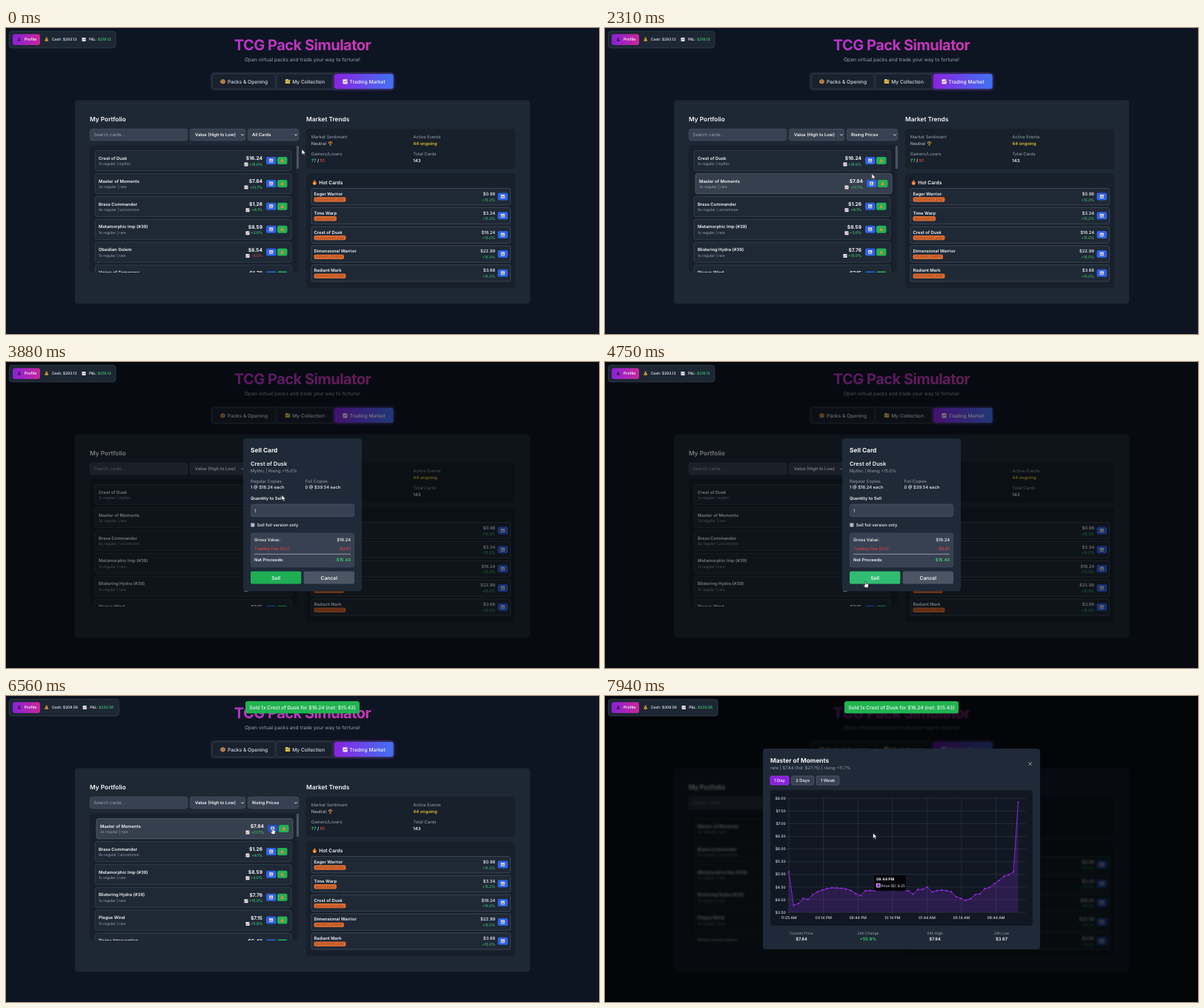
An HTML page that plays this animation: 800 px wide and 413 px high, repeating every 8 s.

```html
<!DOCTYPE html>
<html lang="en">
<head>
<meta charset="utf-8">
<title>TCG Pack Simulator</title>
<style>
  html, body { margin: 0; height: 100%; overflow: hidden; background: #0e1522; }
  svg { display: block; width: 100vw; height: 100vh; font-family: Inter, sans-serif; text-rendering: geometricPrecision; }
</style>
</head>
<body>
<svg viewBox="0 0 800 413" preserveAspectRatio="none">
  <defs>
    <linearGradient id="title" gradientUnits="userSpaceOnUse" x1="100" x2="700"><stop stop-color="#a12fe6"/><stop offset="1" stop-color="#df3d96"/></linearGradient>
    <linearGradient id="profile"><stop stop-color="#8a22d6"/><stop offset="1" stop-color="#c8269a"/></linearGradient>
    <linearGradient id="active"><stop stop-color="#8a22e0"/><stop offset="1" stop-color="#3f72f2"/></linearGradient>
    <filter id="glow" x="-20%" y="-60%" width="140%" height="220%"><feGaussianBlur stdDeviation="2.5"/></filter>
    <filter id="blur"><feGaussianBlur stdDeviation="1.3"/></filter>
    <clipPath id="list"><rect x="113" y="158" width="280" height="172"/></clipPath>
  </defs>
  <g id="scene"></g>
  <g id="cursor" stroke="#111" stroke-width=".6" stroke-linejoin="round" fill="#fff">
    <path id="arrow" d="M0 0V7.4L1.8 5.8 3 8.6 4.3 8 3.1 5.4H5.4Z"/>
    <path id="hand" d="M-.7 .4Q0-.5 .7 .4V3L3.4 3.6Q4.2 3.9 4 5L3.3 8.4H-.6L-2.8 5.2Q-2.4 4.2-.7 5.4Z"/>
  </g>
</svg>
<script>
const LOOP = 8000;
const OPEN = 850, PICK = 2030, SELL = 3750, SOLD = 5380, CHART = 7880;
const SM = 5.83, XS = 5, MD = 6.67, XL = 8.33;
const GREY = '#9ca3af', GREEN = '#43d675', RED = '#ef4444', WHITE = '#f5f6f8';
const CARD = 'Crest of Dusk';

const $ = id => document.getElementById(id);
const box = (x, y, w, h, fill, stroke = 'none', r = 3, extra = '') =>
  `<rect x="${x}" y="${y}" width="${w}" height="${h}" rx="${r}" fill="${fill}" stroke="${stroke}" stroke-width=".7" ${extra}/>`;
const text = (x, y, s, size = SM, fill = WHITE, weight = 400, anchor = 'start', extra = '') =>
  `<text x="${x}" y="${y}" font-size="${size}" fill="${fill}" font-weight="${weight}" text-anchor="${anchor}" ${extra}>${s}</text>`;
const path = (d, stroke, width = .7, fill = 'none') =>
  `<path d="${d}" stroke="${stroke}" stroke-width="${width}" fill="${fill}"/>`;
const group = (x, y, k, body) => `<g transform="translate(${x} ${y}) scale(${k})">${body}</g>`;

// Small icons, drawn around their centre in a box of about six units
const trend = (x, y, k = 1) => group(x, y, k, box(-2.8, -2.8, 5.6, 5.6, '#e8edf3', 'none', .6) + path('M-2 1.6L-.6-.2 .5 .7 2-1.8', '#b0485e', .8));
const bars = (x, y, k = 1) => group(x, y, k, box(-2.8, -2.8, 5.6, 5.6, '#dce8f5', 'none', .6)
  + path('M-1.6 2V-.2', '#2fa65a', 1.1) + path('M0 2V-1.8', '#d0504a', 1.1) + path('M1.6 2V.4', '#3478d8', 1.1));
const money = (x, y, k = 1) => group(x, y, k, path('M-1.2-2.8H1.2L.8-1.3Q3 .6 2.5 2.4Q0 3.4-2.5 2.4Q-3 .6-.8-1.3Z', '#8a5a22', .3, '#dca548') + path('M0-.2V2', '#7a4a18', .7));
const flame = (x, y) => path(`M${x} ${y - 3.6}Q${x + 1} ${y - 1.6} ${x + 2.6} ${y}Q${x + 3.2} ${y + 3.4} ${x} ${y + 3.4}Q${x - 3.2} ${y + 3.2} ${x - 2.3} ${y - .4}L${x - 1.2} ${y - 1}Z`, 'none', 0, '#f0692c')
  + `<ellipse cx="${x}" cy="${y + 1.8}" rx="1.1" ry="1.5" fill="#fbc24a"/>`;
const scales = (x, y) => path(`M${x - 2.6} ${y - 1.5}H${x + 2.6}M${x} ${y - 2.8}V${y + 2.4}M${x - 1.6} ${y + 2.5}H${x + 1.6}`, '#d99a3c', .8)
  + path(`M${x - 3} ${y + .4}h2l-1-1.8zM${x + 1} ${y + .4}h2l-1-1.8z`, 'none', 0, '#d9803c');
const parcel = (x, y) => path(`M${x} ${y - 3.4}l3.2 1.6v3.6l-3.2 1.7-3.2-1.7v-3.6z`, 'none', 0, '#c58a52') + path(`M${x - 3.2} ${y - 1.8}l3.2 1.6 3.2-1.6M${x} ${y - .2}v3.6`, '#7d4c28', .6);
const folder = (x, y) => box(x - 3.2, y - 2.6, 6.4, 5.4, '#d9b447', 'none', .6) + box(x - 2.4, y - 3.2, 2.6, 1.4, '#e9dfb0', 'none', .3) + path(`M${x - 3.2} ${y - .6}h6.4`, '#8b7530', .6);
const person = (x, y) => `<circle cx="${x}" cy="${y - 1.2}" r="1.3" fill="#3c1668"/>` + path(`M${x - 2.3} ${y + 2.4}q0-2.4 2.3-2.4t2.3 2.4z`, 'none', 0, '#3c1668');
const chevron = x => path(`M${x - 1.7} 143.4l1.7 1.7 1.7-1.7`, WHITE, .9);

// name, detail, price, change
const cards = {
  force: [CARD, '1x regular | mythic', '$16.24', '+15.0%'],
  master: ['Master of Moments', '2x regular | rare', '$7.84', '+11.7%'],
  brass: ['Brass Commander', '9x regular | uncommon', '$1.26', '+4.1%'],
  imp: ['Metamorphic Imp (#39)', '1x regular | rare', '$8.59', '+3.0%'],
  golem: ['Obsidian Golem', '1x regular | rare', '$8.54', '-4.5%'],
  vision: ['Vision of Tomorrow', '1x regular | rare', '$1.78', '+1.2%'],
  hydra: ['Blistering Hydra (#39)', '1x regular | rare', '$7.76', '+15.0%'],
  plague: ['Plague Wind', '1x regular | rare', '$7.15', '+5.9%'],
  divine: ['Divine Intervention', '1x regular | rare', '$5.48', '+2.4%'],
};
const rising = ['force', 'master', 'brass', 'imp', 'hydra', 'plague', 'divine'];
const lists = {
  all: ['force', 'master', 'brass', 'imp', 'golem', 'vision'],
  rising: rising.slice(0, 6),
  sold: rising.slice(1),
};
const hotCards = [
  ['Eager Warrior', 'tournament_play', '$0.98', '+15.3%', 43],
  ['Time Warp', 'speculation', '$3.34', '+15.2%', 30.5],
  [CARD, 'tournament_play', '$16.24', '+15.0%', 43],
  ['Dimensional Warrior', 'content_creator', '$22.99', '+15.0%', 40.5],
  ['Radiant Mark', 'tournament_play', '$3.68', '+15.0%', 43],
];
const filters = ['All Cards', 'Commons Only', 'Uncommons Only', 'Rares Only', 'Mythics Only', 'Foils Only', 'Rising Prices', 'Falling Prices'];
const prices = [5.1, 3.78, 3.85, 4.05, 4.01, 4.2, 4.31, 4.38, 4.44, 4.47, 4.46, 4.45, 4.42, 4.36, 4.24, 4.16,
  4.35, 4.36, 4.35, 4.38, 4.42, 4.4, 4.36, 4.38, 4.37, 4.35, 4.22, 4.4, 4.41, 4.5, 4.3, 4.36, 4.38, 4.36,
  4.31, 4.12, 4.05, 3.97, 4.04, 4.2, 4.23, 4.43, 4.48, 4.63, 4.76, 4.92, 4.98, 5.1];
prices[prices.length - 1] = 5.1;
prices.push(7.84);

const ROW_TOP = 165.5, ROW_STEP = 30.9;

function portfolioRow(key, i, s) {
  const [name, detail, price, change] = cards[key];
  const hover = s.row === i;
  const y = ROW_TOP + i * ROW_STEP;
  const sellFill = hover && s.button === 'sell' ? '#1b8440' : '#1fb455';
  const chartFill = hover && s.button === 'chart' ? '#2450c4' : '#2f62e8';
  return `<g transform="translate(${hover ? 2 : 0} ${y})">`
    + box(120, 0, 265, 27.2, hover ? '#363f4d' : '#1f2936', hover ? '#5d6675' : '#3c4654')
    + text(125, 12.3, name, SM, WHITE, 600) + text(125, 19.6, detail, XS, GREY)
    + text(346, 12.7, price, MD, WHITE, 700, 'end')
    + text(346, 20.2, change, XS, change[0] === '-' ? RED : GREEN, 500, 'end')
    + trend(change.length > 5 ? 324 : 326, 18.5, .9)
    + box(351, 8.5, 13.5, 10, chartFill, 'none', 2) + bars(357.7, 13.5, .9)
    + box(366, 8.5, 13.5, 10, sellFill, 'none', 2) + money(372.7, 13.5, .9) + '</g>';
}

function hotRow([name, tag, price, change, width], i) {
  return `<g transform="translate(0 ${216.5 + i * 25.8})">`
    + box(412, 0, 268.5, 22.3, '#1f2936', '#4a5361', 2)
    + text(415.5, 9.6, name, SM, WHITE, 600)
    + box(415.5, 11.8, width, 6.4, '#d96a31', 'none', 2) + text(417.5, 16.5, tag, 4.9, '#95421c')
    + text(660, 9.6, price, SM, WHITE, 500, 'end') + text(660, 17, change, XS, GREEN, 400, 'end')
    + box(663.5, 6, 13.5, 10, '#2f62e8', 'none', 2) + bars(670.2, 11, .9) + '</g>';
}

function page(s) {
  return text(400, 30.2, 'TCG Pack Simulator', 20, 'url(#title)', 700, 'middle', 'letter-spacing="-.5"')
    + text(400, 44.5, 'Open virtual packs and trade your way to fortune!', MD, GREY, 400, 'middle')
    + box(276.5, 60.5, 247, 23, '#1e2733', '#2c3644', 4)
    + box(278.5, 62, 84.5, 20, '#18212d', '#343e4c') + box(365, 62, 76, 20, '#18212d', '#343e4c')
    + box(443, 62, 79.5, 20, '#7a2be0', 'none', 3, 'filter="url(#glow)" opacity=".6"') + box(443, 62, 79.5, 20, 'url(#active)')
    + parcel(292.5, 72.3) + text(299, 74.7, 'Packs &amp; Opening', MD, '#d8dce2', 500)
    + folder(380, 72.3) + text(386.2, 74.7, 'My Collection', MD, '#d8dce2', 500)
    + trend(457.5, 72.3, 1.1) + text(463.5, 74.7, 'Trading Market', MD, WHITE, 500)
    + box(93, 97.5, 614, 274.5, '#1e2834', 'none', 4)
    + text(113, 126.4, 'My Portfolio', XL, WHITE, 600) + text(405, 126.4, 'Market Trends', XL, WHITE, 600)
    + box(113.3, 136.3, 131.5, 15.5, '#374151', '#4b5563') + text(118.3, 146.2, 'Search cards...', 6, GREY)
    + box(248.3, 136.3, 74.5, 15.5, '#374151', '#4b5563') + text(255, 146.2, 'Value (High to Low)', SM, WHITE, 600) + chevron(319)
    + box(326.3, 136.3, 68.5, 15.5, '#374151', s.open ? '#8b5cf6' : '#4b5563')
    + (s.open ? box(325.4, 135.4, 70.4, 17.3, 'none', '#8746e8', 3.5) : '')
    + text(332, 146.2, s.list === 'all' ? 'All Cards' : 'Rising Prices', SM, WHITE, 600) + chevron(391)
    + box(113, 158, 279, 172, '#17202b', 'none', 4)
    + box(391.8, 158, 3.2, 172, '#1b2430', 'none', 1) + box(391.8, 159, 3.2, 31, '#4a5361', 'none', 1)
    + '<g clip-path="url(#list)">' + lists[s.list].map((key, i) => portfolioRow(key, i, s)).join('') + '</g>'
    + box(405, 136, 282, 54, '#17202b', 'none', 4)
    + text(411.8, 149, 'Market Sentiment', SM, GREY) + text(411.8, 157.6, 'Neutral', SM, '#c9ced6') + scales(437.5, 155.5)
    + text(549.3, 149, 'Active Events', SM, GREY) + text(549.3, 157.6, '44 ongoing', SM, '#e3c02c', 600)
    + text(411.8, 172.2, 'Gainers/Losers', SM, GREY)
    + text(411.8, 180.6, `<tspan fill="${GREEN}">77</tspan> / <tspan fill="${RED}">51</tspan>`, SM, WHITE, 600)
    + text(549.3, 172.2, 'Total Cards', SM, GREY) + text(549.3, 180.6, '143', SM, WHITE, 600)
    + box(405, 196.5, 282, 155, '#17202b', 'none', 4)
    + flame(416.2, 208.3) + text(422.3, 210.7, 'Hot Cards', MD, WHITE, 600)
    + hotCards.map(hotRow).join('')
    + (s.open ? dropdown(s.option) : '');
}

function dropdown(option) {
  return box(326.3, 152.3, 68.4, 61, '#374151', '#4b5563', 1)
    + filters.map((name, i) => (i === option ? box(326.6, 190 + (i - 5) * 7.5, 67.8, 7.5, '#2b6be8', 'none', 0) : '')
      + text(333, 158.3 + i * 7.5, name, SM, WHITE, 500)).join('');
}

function profileBar(sold) {
  const dx = sold ? 1.2 : 0;
  return box(4.3, 4.3, sold ? 148 : 143.7, 22.6, '#1d2734', '#38424f', 4)
    + box(9, 8.3, 37, 14.7, 'url(#profile)') + person(17.8, 15.4) + text(25, 17.4, 'Profile', 5.2, WHITE, 600)
    + money(54.7, 15.3, .9) + text(61.7, 17.3, `Cash: $${sold ? '308.56' : '293.13'}`, XS, WHITE, 500)
    + trend(105 + dx, 15.5, .9)
    + text(112 + dx, 17.3, `P&amp;L: <tspan fill="${GREEN}">$${sold ? '233.56' : '218.13'}</tspan>`, XS, WHITE, 500);
}

const overlay = alpha => box(0, 0, 800, 413, '#000', 'none', 0, `opacity="${alpha}"`);

function sellModal(hover) {
  return overlay(.5) + box(320, 103.3, 160, 206, '#1f2937', 'none', 4)
    + text(330, 121.8, 'Sell Card', XL, WHITE, 700) + text(330, 139.6, CARD, 7.5, WHITE, 600)
    + text(330, 149, 'Mythic | Rising +15.0%', SM, GREY)
    + text(330, 162.5, 'Regular Copies', SM, GREY) + text(330, 171.2, '1 @ $16.24 each', SM, WHITE, 500)
    + text(403.5, 162.5, 'Foil Copies', SM, GREY) + text(403.5, 171.2, '0 @ $39.54 each', SM, WHITE, 500)
    + text(330, 186, 'Quantity to Sell', SM, WHITE, 600)
    + box(330.3, 192, 139.4, 16.7, '#374151', '#4b5563') + text(335, 202.5, '1', SM)
    + box(330.3, 217.4, 5, 5, '#b9bec6', '#6b7280', .8) + text(338.5, 222, 'Sell foil version only', SM, WHITE, 500)
    + box(330.3, 231, 139.4, 45.7, '#374151', '#465060')
    + text(335, 242, 'Gross Value:', SM, WHITE, 500) + text(465, 242, '$16.24', SM, WHITE, 500, 'end')
    + text(335, 253.6, 'Trading Fee (5%):', SM, RED) + text(465, 253.6, '-$0.81', SM, RED, 400, 'end')
    + path('M335 259.3H465', '#d5d9df', .6)
    + text(335, 269, 'Net Proceeds:', SM, WHITE, 600) + text(465, 269, '$15.43', SM, GREEN, 600, 'end')
    + box(330, 282.6, 68.3, 17, hover ? '#30bd72' : '#1fae54', 'none', 2) + text(364, 293.5, 'Sell', MD, WHITE, 600, 'middle')
    + box(401.7, 282.6, 68.3, 17, '#4b5563', 'none', 2) + text(435.8, 293.5, 'Cancel', MD, WHITE, 600, 'middle');
}

function chartModal() {
  const px = i => 248 + i * 309.4 / (prices.length - 1);
  const py = v => 292 - (v - 3.5) * 34.2;
  const line = prices.map((v, i) => `${i ? 'L' : 'M'}${px(i).toFixed(1)} ${py(v).toFixed(1)}`).join('');
  let out = overlay(.72) + box(213, 71, 374, 271, '#1f2937', 'none', 4)
    + text(223, 90, 'Master of Moments', XL, WHITE, 700)
    + text(223, 99.2, 'rare | $7.84 (foil: $27.75) | rising +11.7%', SM, GREY)
    + path('M571.3 89.3l4.4 4.4m0-4.4l-4.4 4.4', '#c5cad2', .8);
  [['1 Day', 223, 25], ['2 Days', 251.7, 30], ['1 Week', 285.3, 30.5]].forEach(([label, x, w], i) => {
    out += box(x, 108, w, 12, i ? '#374151' : '#8a22dc', i ? '#596270' : '#9b3cf0', 1.5)
      + text(x + w / 2, 116.2, label, SM, WHITE, 500, 'middle');
  });
  out += box(223, 127, 354, 183, '#111823', 'none', 4);
  for (let v = 3.5; v <= 8; v += .5)
    out += path(`M245 ${py(v)}H568`, '#38404c', .5) + text(243.7, py(v) + 1.7, '$' + v.toFixed(2), XS, '#dfe3e8', 500, 'end');
  ['11:25 AM', '03:14 PM', '06:44 PM', '10:14 PM', '01:44 AM', '05:14 AM', '08:44 AM'].forEach((label, i) => {
    const x = 248 + i * 46.58;
    out += path(`M${x} 138V295`, '#38404c', .5) + text(x, 301, label, XS, '#dfe3e8', 500, 'middle');
  });
  out += path(`${line}V292H248Z`, 'none', 0, 'rgba(147,51,234,.2)') + path(line, '#8d22dc', 1);
  out += prices.map((v, i) => `<circle cx="${px(i)}" cy="${py(v)}" r="1.1" fill="#9a2cec"/>`).join('')
    + box(363, 242, 43, 21, '#030408', 'none', 2)
    + text(366, 249.4, '08:44 PM', XS, WHITE, 700)
    + box(366.5, 253.4, 4.6, 4.6, '#8d22dc', '#fff', 0) + text(372.4, 257.6, 'Price ($): 4.25', 4.8);
  [['Current Price', '$7.84'], ['24h Change', '+55.9%'], ['24h High', '$7.84'], ['24h Low', '$3.67']].forEach(([label, value], i) => {
    const x = 265 + i * 90;
    out += text(x, 322, label, XS, GREY, 400, 'middle') + text(x, 330.3, value, SM, i === 1 ? GREEN : WHITE, 600, 'middle');
  });
  return out;
}

const toast = () => box(323, 7, 154, 16.5, '#21b351')
  + text(400, 17.7, `Sold 1x ${CARD} for $16.24 (net: $15.43)`, MD, WHITE, 500, 'middle');

// time, x, y of the pointer tip
const track = [
  [0, 399, 163.5], [60, 399, 163.5], [780, 361, 146], [880, 361, 146], [1190, 358.5, 193], [1440, 358, 201],
  [2060, 358, 201], [2750, 364, 186], [3380, 372.5, 176.5], [3800, 372.5, 176.5], [4650, 351.5, 296],
  [5460, 351.5, 296], [6500, 359.5, 178], [CHART - 1, 359.5, 178], [CHART, 361.5, 185], [LOOP, 361.5, 185],
];
function pointer(t) {
  const i = track.findIndex(k => k[0] > t);
  const [t0, x0, y0] = track[i - 1], [t1, x1, y1] = track[i];
  const u = (t - t0) / (t1 - t0), e = u * u * (3 - 2 * u);
  return [x0 + (x1 - x0) * e, y0 + (y1 - y0) * e];
}

function stateAt(t, x, y) {
  const s = {
    list: t < PICK ? 'all' : t < SOLD ? 'rising' : 'sold',
    open: t >= OPEN && t < PICK,
    modal: t >= CHART ? 'chart' : t >= SELL && t < SOLD ? 'sell' : '',
    sold: t >= SOLD, row: -1, option: -1, button: '',
  };
  if (s.open) s.option = Math.max(0, Math.floor((y - 152.5) / 7.5));
  else if (s.modal === 'sell') {
    if (x > 330 && x < 398 && y > 282 && y < 300) s.button = 'confirm';
  } else if (!s.modal && x > 120 && x < 387 && y > ROW_TOP && y < 330) {
    const row = Math.floor((y - ROW_TOP) / ROW_STEP), dy = y - ROW_TOP - row * ROW_STEP;
    if (dy < 27.2) {
      s.row = row;
      if (dy > 8.5 && dy < 18.5) s.button = x > 368 && x < 381.5 ? 'sell' : x > 353 && x < 366.5 ? 'chart' : '';
    }
  }
  return s;
}

let shown = '';
function frame(now) {
  const t = now % LOOP;
  const [x, y] = pointer(t);
  const s = stateAt(t, x, y);
  const key = JSON.stringify(s);
  if (key !== shown) {
    shown = key;
    $('scene').innerHTML = box(0, 0, 800, 413, '#0e1522', 'none', 0)
      + `<g ${s.modal === 'chart' ? 'filter="url(#blur)"' : ''}>${page(s)}</g>`
      + (s.modal === 'sell' ? sellModal(s.button === 'confirm') : s.modal === 'chart' ? chartModal() : '')
      + profileBar(s.sold) + (s.sold ? toast() : '');
    $('arrow').style.display = s.button ? 'none' : '';
    $('hand').style.display = s.button ? '' : 'none';
  }
  $('cursor').setAttribute('transform', `translate(${x.toFixed(2)} ${y.toFixed(2)})`);
  requestAnimationFrame(frame);
}
requestAnimationFrame(frame);
</script>
</body>
</html>
```
